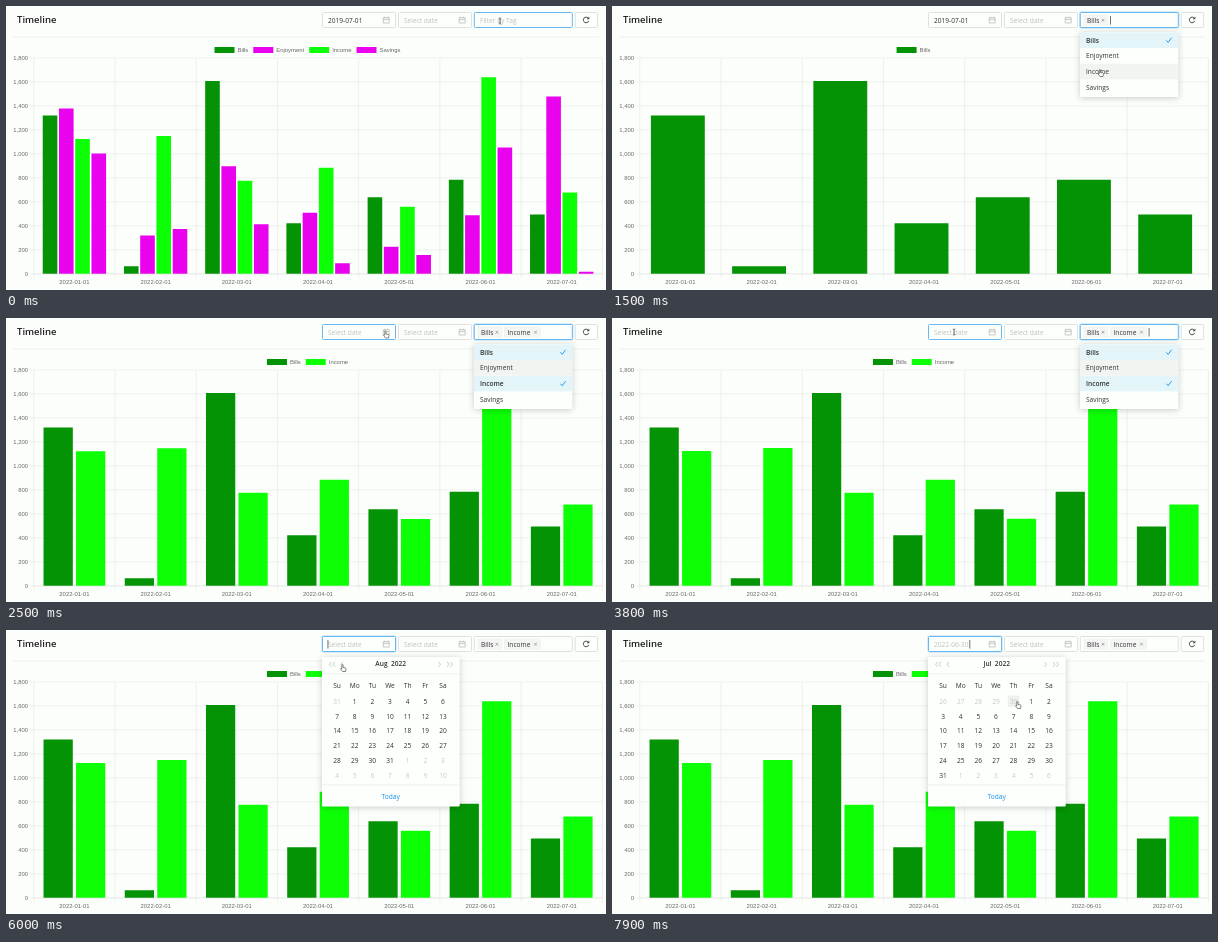
An HTML page that plays this animation: 600x284 px, repeating every 8000 ms.

```html
<!DOCTYPE html>
<html lang="en">
<head>
<meta charset="utf-8">
<title>Timeline</title>
<style>
  html, body { margin: 0; width: 100%; height: 100%; overflow: hidden; background: #fcfefc; }
  svg { display: block; width: 100%; height: 100%; }
  text { font: 6.6px "Open Sans", "Noto Sans", sans-serif; fill: #303030; white-space: pre; }
  .chart text { font: 5.9px "Liberation Sans", Arial, sans-serif; fill: #666; }
  .title { font-size: 9.5px; font-weight: 600; fill: #1c1c1c; }
  .bold { font-weight: 600; }
  .mid { text-anchor: middle; }
  .end { text-anchor: end; }
  .icon { fill: none; stroke: #b4b6b4; stroke-width: .7; }
  .grid { stroke: #e3e6e3; stroke-width: .6; fill: none; }
  .panel { fill: #fdfffd; filter: drop-shadow(0 1.5px 3px rgba(0, 0, 0, .2)); }
</style>
</head>
<body>
<svg id="stage" viewBox="0 0 600 284" preserveAspectRatio="none"></svg>
<script>
const LOOP = 8000;
const T = { open: 300, pickBills: 1070, pickIncome: 1685, clear: 2300, calendar: 4500, august: 5700, july: 6300 };
const BLUE = '#1890e8', LIGHT_BLUE = '#45a9ee', GRAY = '#d8dad8', FAINT = '#bdbfbd', INK = '#303030';
const stage = document.getElementById('stage');

function el(name, attrs, parent = stage, content = '') {
  const node = document.createElementNS('http://www.w3.org/2000/svg', name);
  for (const key in attrs) node.setAttribute(key, attrs[key]);
  node.textContent = content;
  return parent.appendChild(node);
}
const group = (cls = '', parent = stage) => el('g', { class: cls }, parent);
const text = (x, y, content, cls = '', parent = stage) => el('text', { x, y, class: cls }, parent, content);
const rect = (x, y, width, height, fill, parent = stage, rx = 0) => el('rect', { x, y, width, height, fill, rx }, parent);
const path = (d, cls = 'icon', parent = stage) => el('path', { d, class: cls }, parent);
const set = (node, attrs) => { for (const key in attrs) node.setAttribute(key, attrs[key]); };
const show = (node, visible) => { node.style.display = visible ? '' : 'none'; };
const clamp = v => Math.max(0, Math.min(1, v));
const mix = (a, b, u) => a + (b - a) * u;
const outQuart = u => 1 - (1 - u) ** 4;
const since = (t, start, length) => clamp((t - start) / length);

// Chart
const PLOT = { left: 27.8, right: 596.4, top: 52, base: 268, pitch: 81.22 };
const series = [
  { name: 'Bills', color: '#049304', label: 10.8, values: [1320, 65, 1608, 422, 640, 785, 495] },
  { name: 'Enjoyment', color: '#e802ee', label: 27.9, values: [1380, 320, 898, 510, 228, 490, 1480] },
  { name: 'Income', color: '#0dff06', label: 19.3, values: [1125, 1150, 778, 886, 560, 1640, 680] },
  { name: 'Savings', color: '#e802ee', label: 21, values: [1005, 375, 415, 90, 158, 1055, 18] }
];
const chart = group('chart');
for (let i = 0; i <= 9; i++) {
  const y = PLOT.base - i * 24;
  path(`M24 ${y}H${PLOT.right}`, 'grid', chart);
  text(22, y + 2, (i * 200).toLocaleString('en-US'), 'end', chart);
}
for (let i = 0; i <= 7; i++) {
  const x = PLOT.left + i * PLOT.pitch;
  path(`M${x} ${PLOT.top}V272`, 'grid', chart);
  if (i < 7) text(x + PLOT.pitch / 2, 278.3, `2022-0${i + 1}-01`, 'mid', chart);
}
[...series].reverse().forEach(s => { s.bars = el('path', { fill: s.color }, chart); });
path(`M${PLOT.left} ${PLOT.base}H${PLOT.right}`, 'grid', chart);
for (const s of series) {
  s.legend = group('', chart);
  rect(0, 41, 20, 6, s.color, s.legend);
  text(23, 46, s.name, '', s.legend);
}

function slot(index, count) {
  const width = PLOT.pitch * .8 / count;
  return { x: PLOT.pitch * .1 + width * (index + .05), w: width * .9 };
}
const mixSlot = (a, b, u) => ({ x: mix(a.x, b.x, u), w: mix(a.w, b.w, u) });

function drawBars(s, { x, w }, grow = 1) {
  s.bars.setAttribute('d', s.values.map((v, i) => {
    const h = v * .12 * grow;
    return `M${PLOT.left + i * PLOT.pitch + x} ${PLOT.base - h}h${w}v${h}h${-w}z`;
  }).join(''));
}

function renderChart(t) {
  const shown = t < T.pickBills ? series : t < T.pickIncome ? [series[0]] : [series[0], series[2]];
  let x = 301.5 - shown.reduce((sum, s) => sum + s.label + 28, -5) / 2;
  for (const s of series) {
    const on = shown.includes(s);
    show(s.bars, on);
    show(s.legend, on);
    if (!on) continue;
    s.legend.setAttribute('transform', `translate(${x})`);
    x += s.label + 28;
    drawBars(s, slot(shown.indexOf(s), shown.length), s === series[2] && t >= T.pickIncome
      ? outQuart(since(t, T.pickIncome, 1000)) : 1);
  }
  const single = mixSlot(slot(0, 4), slot(0, 1), outQuart(since(t, T.pickBills, 1000)));
  drawBars(series[0], mixSlot(single, slot(0, 2), outQuart(since(t, T.pickIncome, 1000))));
}

// Header
text(11, 16.7, 'Timeline', 'title');
path('M7 31H593', 'grid');

function field(x, width) {
  const glow = el('rect', { x: x - .6, y: 5.9, width: width + 1.2, height: 16.2, rx: 1.4, fill: 'none', stroke: '#bfe2f8', 'stroke-width': 1 });
  const box = el('rect', { x, y: 6.5, width, height: 15, rx: 1, fill: '#fdfffd', stroke: GRAY, 'stroke-width': .8 });
  return { x, width, box, glow };
}
function styleField(f, focused, p) {
  const hover = p.x > f.x && p.x < f.x + f.width && p.y > 6 && p.y < 22;
  show(f.glow, focused);
  f.box.setAttribute('stroke', focused || hover ? LIGHT_BLUE : GRAY);
}
const calendarIcon = x => path(`M${x - 3} 11.7h6v5.3h-6zM${x - 3} 13.6h6M${x - 1.5} 10.7v1.7M${x + 1.5} 10.7v1.7`);

const startField = field(316.5, 73);
const endField = field(392.5, 73);
const tagField = field(468.3, 98);
field(569.2, 22.3).glow.remove();
show(endField.glow, false);
const startText = text(322, 16.6, '');
text(398, 16.6, 'Select date').style.fill = FAINT;
const startIcon = calendarIcon(380.2);
calendarIcon(456.2);
const clearIcon = group();
el('circle', { cx: 380.2, cy: 14, r: 3, fill: '#a8aaa8' }, clearIcon);
path('M379 12.8l2.4 2.4M381.4 12.8l-2.4 2.4', 'icon', clearIcon).style.stroke = '#fff';
path('M582.4 12.3A2.8 2.8 0 1 0 582.8 14.8M582.9 10.9V12.8H581').style.cssText = 'stroke:#333;stroke-width:.9';

const placeholder = text(474, 16.6, 'Filter by Tag');
placeholder.style.fill = FAINT;
function tag(x, width, name) {
  const g = group();
  set(rect(x, 9, width, 10.2, '#f4f6f4', g, .8), { stroke: '#eaecea', 'stroke-width': .5 });
  text(x + 3, 16.6, name, '', g);
  const c = x + width - 5;
  path(`M${c - 1.4} 12.8l2.8 2.8M${c + 1.4} 12.8l-2.8 2.8`, 'icon', g).style.stroke = '#8a8c8a';
  return g;
}
const billsTag = tag(472, 24, 'Bills');
const incomeTag = tag(498.5, 36, 'Income');
const caret = rect(0, 10, .7, 8.6, '#333');

// Tag menu
const menu = group();
el('rect', { x: 468, y: 26, width: 98.3, height: 65, rx: 1, class: 'panel' }, menu);
const options = series.map((s, i) => {
  const y = 26.3 + i * 15.7;
  const back = rect(468, y, 98.3, 15.7, 'none', menu);
  const label = text(474, y + 10.2, s.name, '', menu);
  const check = path(`M554.3 ${y + 8}l1.9 2 3.4-4.5`, 'icon', menu);
  check.style.cssText = `stroke:${BLUE};stroke-width:.9`;
  return { back, label, check };
});

function renderMenu(t) {
  const active = t < 1260 ? 0 : t < 1370 ? 1 : t < 1760 ? 2 : 1;
  const picked = [T.pickBills, Infinity, T.pickIncome, Infinity];
  options.forEach((o, i) => {
    const chosen = t >= picked[i];
    const tinted = chosen && t >= picked[i] + 150;
    o.back.setAttribute('fill', tinted ? '#e3f5f9' : i === active ? '#f2f4f2' : 'none');
    o.label.setAttribute('class', chosen ? 'bold' : '');
    show(o.check, chosen);
  });
  slide(menu, since(t, T.open, 200) - since(t, T.calendar, 200), 26);
}

function slide(node, u, top) {
  show(node, u > 0);
  node.setAttribute('opacity', u);
  node.setAttribute('transform', `translate(0 ${top}) scale(1 ${.8 + .2 * outQuart(u)}) translate(0 ${-top})`);
}

// Date panel
const CELL = { x: 322.2, y: 64, w: 17.65, h: 14.75 };
const panel = group();
el('rect', { x: 316, y: 27, width: 137.7, height: 149.5, rx: 1, class: 'panel' }, panel);
path('M316 44H453.7M316 155H453.7', 'grid', panel);
const heading = text(384.7, 36.4, '', 'bold mid', panel);
const chevron = (x, dir) => path(`M${x + dir} 31.8l${-2 * dir} 2.5 ${2 * dir} 2.5`, 'icon', panel);
[[324.5, 1], [328, 1], [336, 1], [433.5, -1], [442, -1], [445.5, -1]].forEach(c => chevron(...c));
const hoverCell = rect(0, 0, 11.6, 11.6, '#eff1ef', panel, 1);
'Su Mo Tu We Th Fr Sa'.split(' ').forEach((d, i) => text(CELL.x + CELL.w * (i + .5), 58.4, d, 'mid', panel));
const days = Array.from({ length: 42 }, (_, i) =>
  text(CELL.x + CELL.w * (i % 7 + .5), CELL.y + CELL.h * (Math.floor(i / 7) + .5) + 2.4, '', 'mid', panel));
text(384.7, 168.5, 'Today', 'mid', panel).style.fill = BLUE;

function renderPanel(t, p) {
  const month = t < T.august ? 8 : t < T.july ? 7 : 6;
  const lead = new Date(Date.UTC(2022, month, 1)).getUTCDay();
  const dateAt = i => new Date(Date.UTC(2022, month, 1 - lead + i));
  heading.textContent = ['Jul', 'Aug', 'Sep'][month - 6] + '  2022';
  days.forEach((node, i) => {
    const date = dateAt(i);
    node.textContent = date.getUTCDate();
    node.style.fill = date.getUTCMonth() === month ? INK : '#c6c8c6';
  });
  const col = Math.floor((p.x - CELL.x) / CELL.w), row = Math.floor((p.y - CELL.y) / CELL.h);
  const inside = t > T.july && row >= 0;
  show(hoverCell, inside);
  set(hoverCell, { x: CELL.x + CELL.w * col + 3, y: CELL.y + CELL.h * row + 1.6 });
  slide(panel, since(t, T.calendar, 200), 27);
  return inside ? dateAt(row * 7 + col).toISOString().slice(0, 10) : '';
}

// Pointer: time, x, y
const route = [
  [0, 494, 15], [400, 494, 15], [850, 490.5, 38], [1150, 490.5, 38], [1450, 488, 63.5], [1690, 488, 63.5],
  [1980, 379.5, 13], [2900, 379.5, 13], [3650, 342, 14], [4700, 342, 14], [5400, 336.5, 34.5],
  [6450, 336.5, 34.5], [7000, 384, 62], [7400, 398, 69], [7800, 405.5, 71.5], [LOOP, 405.5, 71.5]
];
function pointerAt(t) {
  const i = route.findIndex(k => k[0] > t);
  const [a, b] = [route[i - 1], route[i]];
  const u = since(t, a[0], b[0] - a[0]);
  const eased = u * u * (3 - 2 * u);
  return { x: mix(a[1], b[1], eased), y: mix(a[2], b[2], eased) };
}
const hand = path('M-.7.3Q0-.4.6.3V3L3 3.5Q3.7 3.8 3.5 4.6L3 7H.1L-2 4.4Q-1.9 3.5-.7 4.1z');
hand.style.cssText = 'fill:#fff;stroke:#333;stroke-width:.6';
const beam = path('M-1.2-3Q0-3 0-2.2Q0-3 1.2-3M0-2.2V2.4M-1.2 3Q0 3 0 2.4Q0 3 1.2 3');
beam.style.cssText = 'stroke:#333;stroke-width:.7';

function render(t) {
  const p = pointerAt(t);
  const picking = t >= T.calendar;
  renderChart(t);
  renderMenu(t);
  const preview = renderPanel(t, p);

  styleField(startField, picking, p);
  styleField(tagField, t >= T.open && !picking, p);
  const cleared = t >= T.clear;
  startText.textContent = !cleared ? '2019-07-01' : preview || 'Select date';
  startText.style.fill = cleared ? FAINT : INK;
  const clearing = !cleared && p.y < 22 && p.x < 389;
  show(clearIcon, clearing);
  show(startIcon, !clearing);

  const hasBills = t >= T.pickBills, hasIncome = t >= T.pickIncome;
  show(placeholder, !hasBills);
  show(billsTag, hasBills);
  show(incomeTag, hasIncome);

  const phase = picking ? 4800 : hasIncome ? 1785 : hasBills ? 1170 : T.open;
  show(caret, t >= phase && (t - phase) % 1000 < 500);
  caret.setAttribute('x', picking ? (preview ? 357.5 : 321.6) : hasIncome ? 536.7 : hasBills ? 498.2 : 473);

  const typing = p.y < 22 && (p.x < 373 || p.x > 468);
  show(beam, typing);
  show(hand, !typing);
  (typing ? beam : hand).setAttribute('transform', `translate(${p.x} ${p.y})`);
}

const begin = performance.now();
function tick() {
  render((performance.now() - begin) % LOOP);
  requestAnimationFrame(tick);
}
tick();
</script>
</body>
</html>
```
